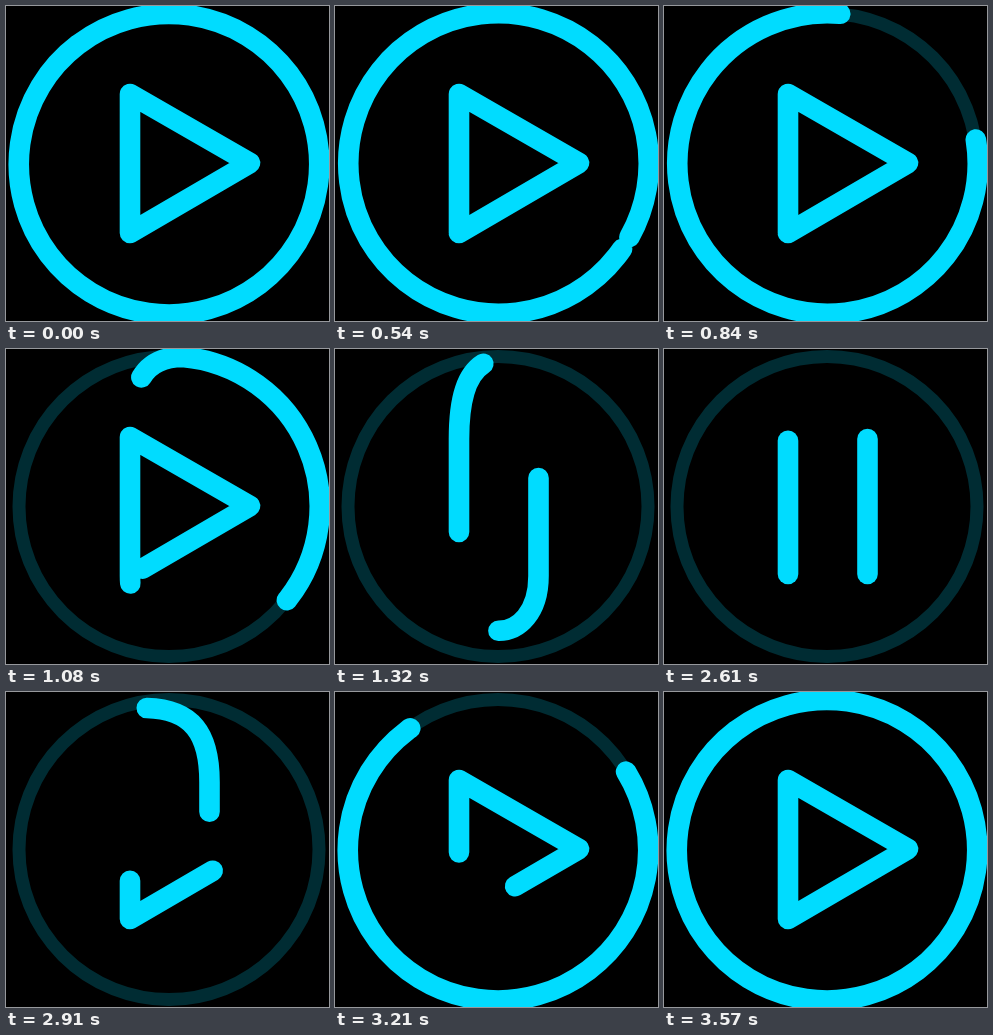
An HTML page for the animation above (4.53 s loop, 323x315 px).

```html
<!DOCTYPE html>
<html lang="en">
<head>
<meta charset="utf-8">
<title>Play / pause</title>
<style>
  html, body { margin: 0; height: 100%; overflow: hidden; background: #000; }
  svg { display: block; width: 100vw; height: 100vh; }
  path, circle { fill: none; stroke-linecap: round; stroke-linejoin: round; }
  path { stroke: #00dcff; stroke-width: 20.6; }
  circle { stroke: #002c33; stroke-width: 13; }
</style>
</head>
<body>
<svg viewBox="0 0 323 315">
  <circle cx="163" cy="157.5" r="150"/>
  <path id="ringToLeft" d="M281.9 250A150.2 150.2 0 0 0 45.1 65A150.2 150.2 0 0 0 281.9 250A150.2 150.2 0 0 0 176.6 7.9C140 8 124 30 124 90V225"/>
  <path id="triangleToRight" d="M124 227L244 157L124 88V227C124 300 203.5 300 203.5 227V90"/>
  <path id="rightToRing" d="M203.5 225V90C203.5 40 185 16 137 16C112 16 90 25.5 72.6 38.2A150.2 150.2 0 0 0 253.4 278.2A150.2 150.2 0 0 0 72.6 38.2"/>
  <path id="leftToTriangle" d="M124 90V227L244 157L124 88V227L244 157"/>
</svg>
<script>
const LOOP = 4530, PAUSE_START = 330, PLAY_START = 2550;
const BAR = 135, RING = 2 * Math.PI * 150.2, TRIANGLE = 416.3;

const byId = id => document.getElementById(id);
const lengthOf = id => byId(id).getTotalLength();

function ease(x, power) {
  x = Math.min(1, Math.max(0, x));
  return x < 0.5 ? (2 * x) ** power / 2 : 1 - (2 - 2 * x) ** power / 2;
}

// Position of one stroke end along its path
const move = (from, to, start, duration, power = 3) =>
  t => from + (to - from) * ease((t - start) / duration, power);

const leftEnd = lengthOf("ringToLeft");
const rightEnd = lengthOf("triangleToRight");
const ringEnd = lengthOf("rightToRing");
const triangleTail = 205;

const toPause = [
  ["ringToLeft", move(0, leftEnd - BAR, 330, 1316), move(RING, leftEnd, 330, 1350)],
  ["triangleToRight", move(0, rightEnd - BAR, 990, 490), move(TRIANGLE, rightEnd, 990, 490)]
];
const toPlay = [
  ["rightToRing", move(0, ringEnd - RING, 2600, 715), move(BAR, ringEnd, 2644, 917)],
  ["leftToTriangle", move(0, triangleTail, 2564, 707, 2), move(BAR, triangleTail + TRIANGLE, 2605, 965, 2)]
];

function drawStrokes(strokes, visible, t) {
  for (const [id, tail, head] of strokes) {
    const { style } = byId(id);
    const from = tail(t);
    style.display = visible ? "" : "none";
    style.strokeDasharray = `${head(t) - from} 9999`;
    style.strokeDashoffset = -from;
  }
}

function frame() {
  let t = performance.now() % LOOP;
  if (t < PAUSE_START) t += LOOP;
  drawStrokes(toPause, t < PLAY_START, t);
  drawStrokes(toPlay, t >= PLAY_START, t);
  requestAnimationFrame(frame);
}
frame();
</script>
</body>
</html>
```
